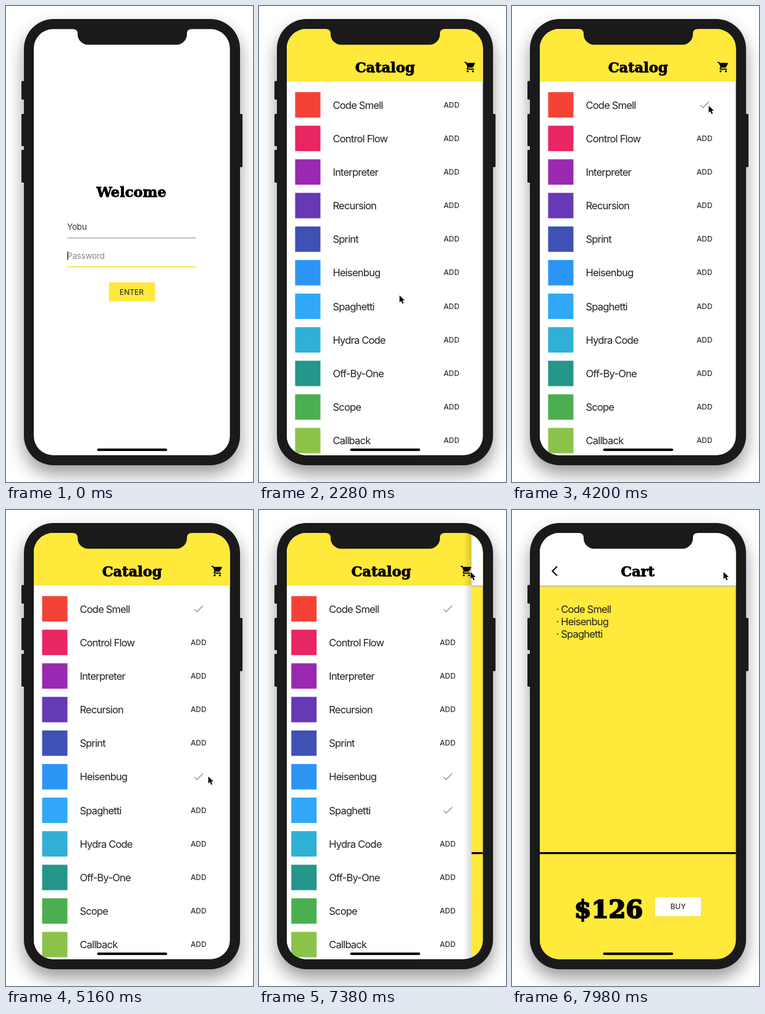
Recreate the animation shown at these times as an HTML page. Size 400 by 768 pixels, loop 8000 ms.

```html
<!DOCTYPE html>
<html lang="en">
<head>
<meta charset="utf-8">
<title>Catalog app</title>
<style>
  html, body { margin: 0; width: 100%; height: 100%; overflow: hidden; background: #fff; }
  svg { display: block; width: 100%; height: 100%; }
  text { font: 16.5px Inter, sans-serif; letter-spacing: -.8px; fill: #222; white-space: pre; }
  .title { font: bold 22.5px "DejaVu Serif", serif; letter-spacing: 0; text-anchor: middle; fill: #000; stroke: #000; stroke-width: .9px; }
  .price { font-size: 40px; stroke-width: 2px; }
  .button { font: 500 11.9px Inter, sans-serif; letter-spacing: 0; text-anchor: middle; fill: #333; }
  .field { font-size: 13.5px; letter-spacing: -.2px; fill: #333; }
  .hint { fill: #888; }
</style>
</head>
<body>
<svg viewBox="0 0 400 768" xmlns="http://www.w3.org/2000/svg">
  <defs>
    <clipPath id="screen"><rect x="45" y="37.3" width="317.6" height="687.4" rx="31"/></clipPath>
    <filter id="blur" x="-20%" y="-20%" width="140%" height="140%"><feGaussianBlur stdDeviation="14"/></filter>
    <linearGradient id="edge"><stop offset="0" stop-opacity="0"/><stop offset="1" stop-opacity=".15"/></linearGradient>
  </defs>

  <rect x="29" y="35" width="350" height="720" rx="48" opacity=".4" filter="url(#blur)"/>
  <g fill="#1a1a1a">
    <rect x="25" y="121" width="8" height="30" rx="1.5"/>
    <rect x="25" y="174" width="8" height="52" rx="1.5"/>
    <rect x="25" y="232" width="8" height="53" rx="1.5"/>
    <rect x="375" y="174" width="8" height="86" rx="1.5"/>
    <rect x="29" y="21" width="350" height="720" rx="48"/>
  </g>

  <g clip-path="url(#screen)">
    <g id="login">
      <rect x="45" y="37" width="318" height="688" fill="#fff"/>
      <text class="title" x="203" y="307.5">Welcome</text>
      <text class="field" x="99" y="361">Yobu</text>
      <rect x="99" y="373.6" width="209" height="1.2" fill="#999"/>
      <text class="field hint" id="hint" x="99" y="407.5">Password</text>
      <g id="dots" fill="#222"></g>
      <rect id="caret" y="396" width="1.7" height="14" fill="#4457d8"/>
      <rect x="99" y="419.7" width="209" height="2" fill="#fbe348"/>
      <rect x="166.5" y="446.5" width="75" height="30.5" rx="2" opacity=".07"/>
      <rect x="166.7" y="446" width="74.4" height="30.3" rx="1.5" fill="#ffe93a"/>
      <text class="button" x="203.5" y="465.6">ENTER</text>
    </g>

    <g id="catalog">
      <rect x="32" y="37" width="13" height="688" fill="url(#edge)"/>
      <rect x="45" y="37" width="318" height="688" fill="#fff"/>
      <rect x="45" y="37" width="318" height="85" fill="#ffe93a"/>
      <text class="title" x="204" y="107">Catalog</text>
      <path transform="translate(332 88.4) scale(.846)" d="M7 18a2 2 0 1 0 0 4 2 2 0 0 0 0-4zM1 2v2h2l3.6 7.59-1.35 2.45C4.5 15.4 5.5 17 7 17h12v-2H7.42c-.2 0-.3-.2-.22-.37l.9-1.63h7.45c.75 0 1.41-.41 1.75-1.03l3.58-6.49C21.3 4.8 20.8 4 20 4H5.21l-.94-2zM17 18a2 2 0 1 0 0 4 2 2 0 0 0 0-4z"/>
      <g id="rows"></g>
    </g>

    <g id="cart">
      <rect x="32" y="37" width="13" height="688" fill="url(#edge)"/>
      <rect x="45" y="37" width="318" height="688" fill="#ffe93a"/>
      <rect x="45" y="37" width="318" height="85" fill="#fff"/>
      <rect x="45" y="121.8" width="318" height="2" fill="#c9c299"/>
      <path d="M73 91l-7.5 7.5 7.5 7.5" fill="none" stroke="#111" stroke-width="2.2"/>
      <text class="title" x="203.5" y="107">Cart</text>
      <g id="bought"></g>
      <rect x="45" y="552" width="318" height="3.2"/>
      <text class="title price" x="156.5" y="657.5">$126</text>
      <rect x="231.5" y="625.5" width="75" height="30.5" rx="2" opacity=".07"/>
      <rect x="231.7" y="625" width="74.4" height="30.3" rx="1.5" fill="#fff"/>
      <text class="button" x="269" y="644.4">BUY</text>
    </g>
    <rect x="147.5" y="714" width="113.5" height="4" rx="2"/>
  </g>

  <path d="M109 36h191v1.2q-7 0-7 7.8a17 17 0 0 1-17 17.5H133A17 17 0 0 1 116 45q0-7.8-7-7.8z" fill="#1a1a1a"/>
  <path id="mouse" d="M.6 1v11.2l2.6-2.4 2 4.5 2-.9-1.9-4.3h3.6z" stroke="#fff" stroke-width="1.6" paint-order="stroke"/>
</svg>

<script>
const $ = id => document.getElementById(id);
const LOOP = 8000, PAGE_WIDTH = 318;
const KEYSTROKES = [120, 240, 360, 480, 630];
const LOGIN_TAP = 1860, CART_TAP = 7372;

const items = [
  ["Code Smell", "#f44336", 4000], ["Control Flow", "#e92662"], ["Interpreter", "#9a28b1"],
  ["Recursion", "#6639b6"], ["Sprint", "#3f51b5"], ["Heisenbug", "#2b95f6", 4980],
  ["Spaghetti", "#30a8f7", 6000], ["Hydra Code", "#30b0d5"], ["Off-By-One", "#24968a"],
  ["Scope", "#4caf50"], ["Callback", "#8bc34a"]
];

// time, x, y of the pointer tip
const pointer = [
  [1000, 300, 520], [1500, 227, 466], [2400, 227, 466], [3120, 352, 293],
  [3700, 318, 160], [4200, 318, 160], [4860, 322, 430], [5160, 327, 429],
  [5640, 320, 486], [6500, 320, 486], [7100, 342, 99], [LOOP, 342, 99]
];

$("rows").innerHTML = items.map(([name, color], i) => `
  <g transform="translate(0 ${i * 54.17})">
    <rect x="58.5" y="139" width="41" height="41" fill="${color}"/>
    <text x="119.5" y="165.5">${name}</text>
    <text class="button" id="add${i}" x="311.7" y="163.6">ADD</text>
    <path id="check${i}" d="M305.3 160l4.1 4.1 9.6-9.7" fill="none" stroke="#a2a2a2" stroke-width="1.7"/>
  </g>`).join("");

$("bought").innerHTML = items.filter(item => item[2]).map(([name], i) =>
  `<text x="71.5" y="${165.5 + i * 20.3}">· ${name}</text>`).join("");

$("dots").innerHTML = KEYSTROKES.map((_, i) =>
  `<circle cx="${102 + i * 6.6}" cy="404" r="2.3"/>`).join("");

const clamp = v => Math.min(1, Math.max(0, v));
const show = (node, on) => node.setAttribute("visibility", on ? "inherit" : "hidden");
const move = (id, x, y = 0) => $(id).setAttribute("transform", `translate(${x} ${y})`);
const bezier = (s, a, b) => 3 * (1 - s) ** 2 * s * a + 3 * (1 - s) * s * s * b + s ** 3;

function slide(t, start) {
  const p = clamp((t - start) / 400);
  let low = 0, high = 1;
  for (let i = 0; i < 20; i++) {
    const mid = (low + high) / 2;
    if (bezier(mid, .35, .33) < p) low = mid; else high = mid;
  }
  return p === 0 || p === 1 ? p : bezier(low, .91, .97);
}

function pointerAt(t) {
  const next = Math.max(1, pointer.findIndex(k => k[0] > t));
  const [t0, x0, y0] = pointer[next - 1], [t1, x1, y1] = pointer[next];
  const p = clamp((t - t0) / (t1 - t0)), e = p * p * (3 - 2 * p);
  return [x0 + (x1 - x0) * e, y0 + (y1 - y0) * e];
}

function render(t) {
  const typed = KEYSTROKES.filter(k => t >= k).length;
  [...$("dots").children].forEach((dot, i) => show(dot, i < typed));
  show($("hint"), !typed);
  $("caret").setAttribute("x", 99 + typed * 6.6);
  show($("caret"), t < 1140);

  const toCatalog = slide(t, LOGIN_TAP), toCart = slide(t, CART_TAP);
  move("login", -toCatalog * PAGE_WIDTH / 3);
  move("catalog", (1 - toCatalog) * PAGE_WIDTH - toCart * PAGE_WIDTH / 3);
  move("cart", (1 - toCart) * PAGE_WIDTH);
  show($("catalog"), toCatalog > 0 && toCart < 1);
  show($("cart"), toCart > 0);

  items.forEach(([, , addedAt = Infinity], i) => {
    show($("add" + i), t < addedAt);
    show($("check" + i), t >= addedAt);
  });

  show($("mouse"), t >= pointer[0][0]);
  move("mouse", ...pointerAt(t));
}

const begin = performance.now();
function tick() {
  render((performance.now() - begin) % LOOP);
  requestAnimationFrame(tick);
}
tick();
</script>
</body>
</html>
```
